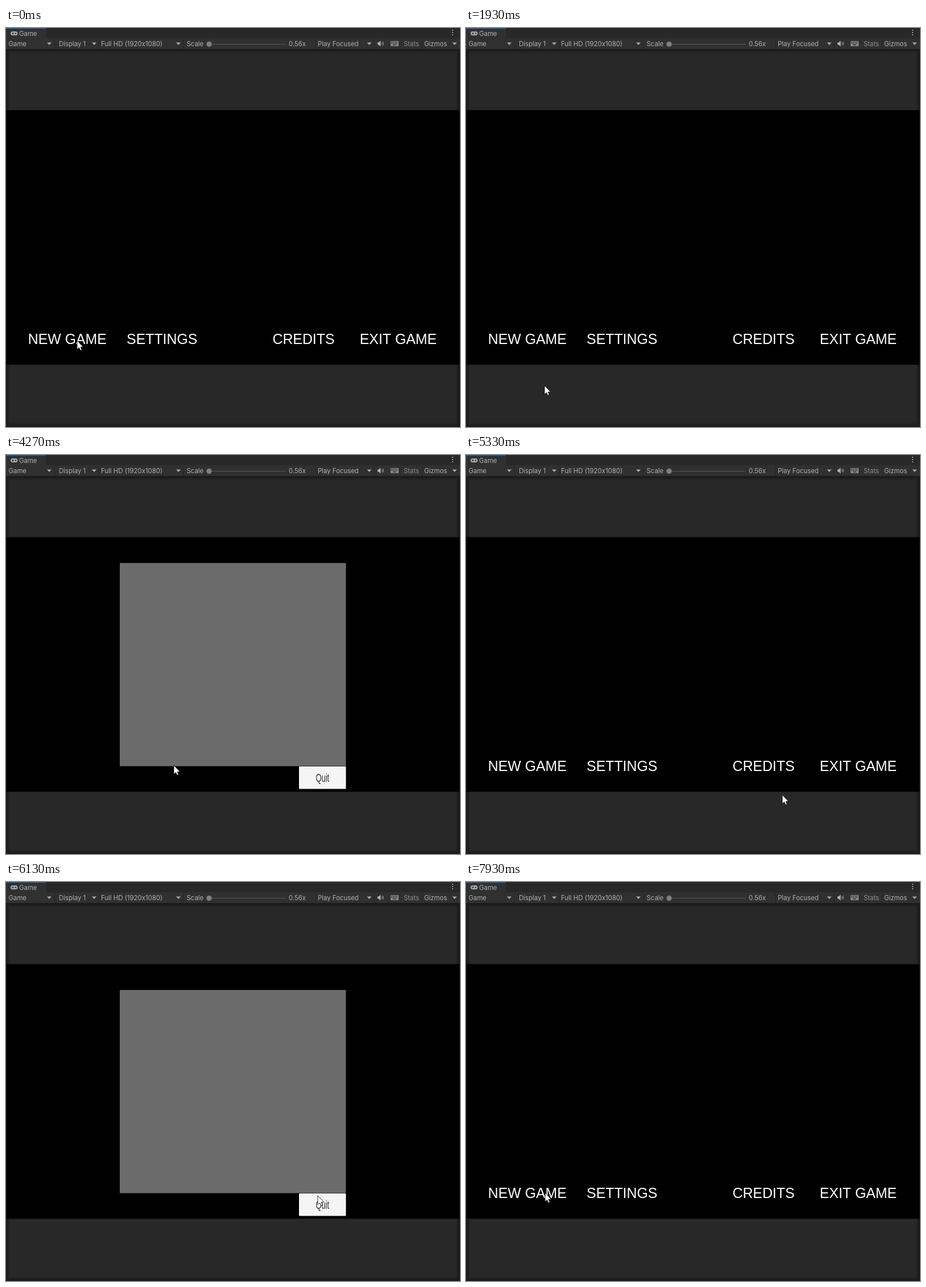
These frames come from a looping animation (798x702 px, 8000 ms). An HTML page with a canvas:

```html
<!DOCTYPE html>
<html lang="en">
<head>
<meta charset="utf-8">
<title>Game menu</title>
<style>
html, body { margin: 0; width: 100%; height: 100%; overflow: hidden; background: #282828; }
canvas { display: block; width: 798px; height: 702px; }
</style>
</head>
<body>
<canvas id="stage" width="798" height="702"></canvas>
<script>
const ctx = document.getElementById('stage').getContext('2d');
const W = 798, H = 702, LOOP = 8000, FPS = 15;
const UI = '11.4px Inter, sans-serif';
const MENU = '24.85px "Liberation Sans", Arial, sans-serif';
const QUIT = '20px "Liberation Sans", Arial, sans-serif';
const BAR = '#303030', INK = '#b0b0b0', EDGE = '#1b1b1b';

// Pointer strokes in ticks of 1/15 s; sway bends the line sideways and down
const home = { x: 125, y: 550 };
const strokes = [
  { at: 0, span: 10, x: 9, y: 144 },
  { at: 20, span: 6, x: 138, y: 629, sway: [275, 0] },
  { at: 29, span: 12, x: 131, y: 550, sway: [105, 80] },
  { at: 45, span: 7, x: 292, y: 543, sway: [70, 0] },
  { at: 55, span: 7, x: 295, y: 546, sway: [-26, 20] },
  { at: 64, span: 9, x: 557, y: 568, sway: [0, 51] },
  { at: 78, span: 10, x: 548, y: 552, sway: [0, 54] },
  { at: 92, span: 9, x: 560, y: 567, sway: [0, 26] },
  { at: 110, span: 9, x: 139, y: 547, sway: [0, 27] }
];
const visits = [{ open: 64, press: 76 }, { open: 92, press: 108 }];
const HOLD = 2;

function box(x, y, w, h, color) {
  ctx.fillStyle = color;
  ctx.fillRect(x, y, w, h);
}

function round(x, y, w, h, r, color) {
  ctx.fillStyle = color;
  ctx.beginPath();
  ctx.roundRect(x, y, w, h, r);
  ctx.fill();
}

function poly(points, color) {
  ctx.fillStyle = color;
  ctx.beginPath();
  points.forEach(([x, y]) => ctx.lineTo(x, y));
  ctx.closePath();
  ctx.fill();
}

function dot(x, y, r, color) {
  round(x - r, y - r, 2 * r, 2 * r, r, color);
}

function label(str, x, y, font, color, align = 'left') {
  ctx.font = font;
  ctx.fillStyle = color;
  ctx.textAlign = align;
  ctx.fillText(str, x, y);
}

function drawTab() {
  box(0, 0, W, 18, '#282828');
  box(0, 0, 70, 18, BAR);
  box(0, 0, 70, 1.5, '#2c5d87');
  round(8, 6, 12.5, 7, 3.5, '#a8a8a8');
  box(10, 9, 4, 1, BAR);
  box(11.5, 7.5, 1, 4, BAR);
  dot(17, 9.5, 1.2, BAR);
  label('Game', 23, 13.5, UI, INK);
  for (let i = 0; i < 3; i++) dot(785, 4 + 4 * i, 1.1, INK);
}

function drawSpeaker(x, y) {
  box(x, y - 2, 3, 4, INK);
  poly([[x + 2, y - 2], [x + 5.5, y - 5], [x + 5.5, y + 5], [x + 2, y + 2]], INK);
  ctx.strokeStyle = INK;
  ctx.lineWidth = 1;
  for (let r = 2.2; r < 5; r += 2.3) {
    ctx.beginPath();
    ctx.arc(x + 6, y, r, -0.9, 0.9);
    ctx.stroke();
  }
}

function drawKeyboard(x, y) {
  round(x, y, 14, 9, 1, '#8c8c8c');
  for (let row = 0; row < 2; row++)
    for (let col = 0; col < 4; col++) box(x + 1 + 3 * col, y + 1 + 2.5 * row, 2, 1.5, BAR);
  box(x + 4, y + 6, 6, 1.5, BAR);
}

// A toolbar cell: text, optional menu arrow, divider on its right
function cell(str, x, arrow, divider, color = INK) {
  label(str, x, 32, UI, color);
  if (arrow) poly([[arrow - 4, 25.5], [arrow + 4, 25.5], [arrow, 30]], '#a8a8a8');
  if (divider) box(divider, 19, 1, 18, '#242424');
}

function drawToolbar() {
  box(0, 18, W, 19, BAR);
  cell('Game', 4.5, 76, 85);
  cell('Display 1', 93, 155, 163);
  cell('Full HD (1920x1080)', 167, 303, 311);
  cell('Scale', 317.5);
  cell('0.56x', 497, 0, 544);
  cell('Play Focused', 548, 638.5, 647);
  cell('Stats', 699, 0, 731, '#8e8e8e');
  cell('Gizmos', 735, 788.5);
  box(357, 28, 134, 1, '#565656');
  dot(357, 28.5, 4.7, '#7f7f7f');
  drawSpeaker(653, 27.5);
  drawKeyboard(676, 23);
}

function drawView() {
  box(0, 37, W, H - 37, '#282828');
  // Soft inner shadow, fading inwards one pixel at a time
  ctx.lineWidth = 1;
  for (let i = 0; i < 7; i++) {
    ctx.strokeStyle = `rgba(0,0,0,${0.4 * (1 - i / 7)})`;
    ctx.strokeRect(i + 0.5, 37.5 + i, W - 1 - 2 * i, H - 38.5 - 2 * i);
  }
  ctx.strokeStyle = EDGE;
  ctx.strokeRect(0.5, 37.5, W - 1, H - 38.5);
  box(1, 144.5, 796, 448, '#000');
}

function drawMenu() {
  const names = [['SETTINGS', 'NEW GAME'], ['CREDITS', 'EXIT GAME']];
  names.forEach((pair, right) => pair.forEach((str, i) => {
    const away = 124.4 + 166.4 * i;
    label(str, 398.6 + (right ? away : -away), 556.2, MENU, '#fff', 'center');
  }));
}

function drawPanel(held) {
  const tone = held < 0 ? '#f5f5f5' : held < 1 ? '#d9d9d9' : '#c8c8c8';
  round(200, 190, 397.5, 357.5, 1, '#6b6b6b');
  round(515, 548, 82.5, 39.5, 1, tone);
  // The button is narrower than its layout size, text included
  ctx.save();
  ctx.translate(556.3, 575);
  ctx.scale(0.65, 1);
  label('Quit', 0, 0, QUIT, '#323232', 'center');
  ctx.restore();
}

function pointerAt(tick) {
  let from = home;
  for (const to of strokes) {
    if (tick < to.at) break;
    const k = (tick - to.at) / to.span;
    if (k < 1) {
      const ease = k * k * (3 - 2 * k), bend = Math.sin(Math.PI * k);
      const [sx, sy] = to.sway || [0, 0];
      return [from.x + (to.x - from.x) * ease + sx * bend, from.y + (to.y - from.y) * ease + sy * bend];
    }
    from = to;
  }
  return [from.x, from.y];
}

function drawPointer([x, y]) {
  ctx.save();
  ctx.translate(Math.round(x), Math.round(y));
  poly([[0, 0], [0, 15.6], [3.5, 12.4], [5.8, 17.4], [8.4, 16.3], [6.1, 11.4], [10.7, 11.2]], '#fff');
  ctx.strokeStyle = '#000';
  ctx.lineWidth = 0.8;
  ctx.stroke();
  ctx.restore();
}

function draw(ms) {
  const tick = Math.floor((ms % LOOP + 5) * FPS / 1000) % (LOOP * FPS / 1000);
  const visit = visits.find(v => tick >= v.open && tick < v.press + HOLD);
  drawTab();
  drawToolbar();
  drawView();
  if (visit) drawPanel(tick - visit.press);
  else drawMenu();
  drawPointer(pointerAt(tick));
}

const start = performance.now();
function loop() {
  draw(performance.now() - start);
  requestAnimationFrame(loop);
}
loop();
</script>
</body>
</html>
```
